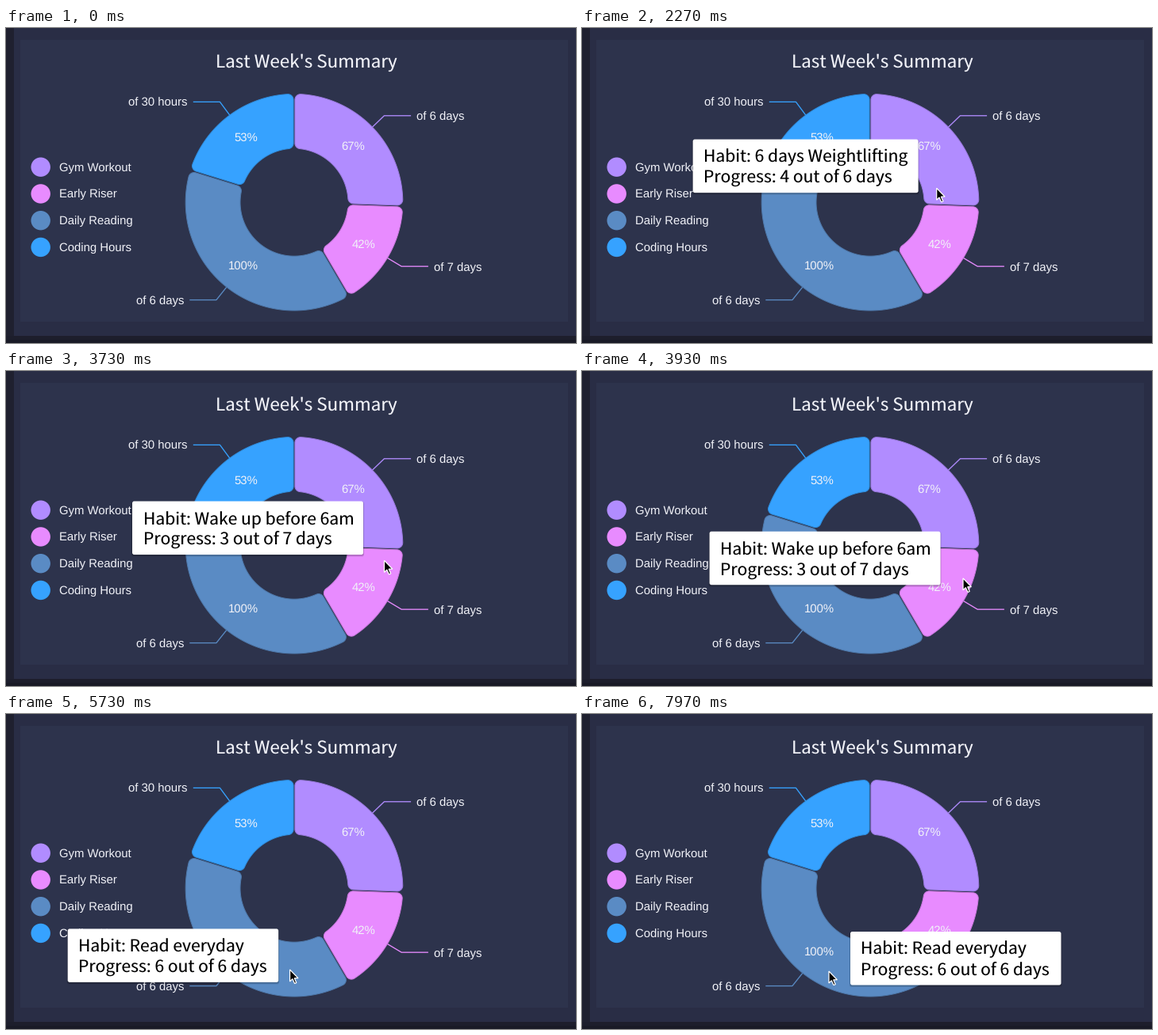
A matplotlib script that plays this animation: 718x398 px, repeating every 8 s.

```python
import numpy as np
import matplotlib.pyplot as plt
from matplotlib.animation import FuncAnimation
from matplotlib.colors import to_rgb
from matplotlib.patches import Circle, FancyBboxPatch, Polygon, Rectangle

W, H, DPI = 718, 398, 100
LOOP, STEP = 8000, 25
CX, CY, R_OUT, R_IN = 363, 220.2, 136.8, 68
CORNER, GAP = 7, 0.95
INK = "#f1f2f8"
SANS, HUMANIST = "Liberation Sans", "Noto Sans CJK JP"

plt.rcParams["text.hinting"] = "none"
plt.rcParams["toolbar"] = "None"

# name, percent, link label, colour
SLICES = [
    ("Gym Workout", 67, "of 6 days", "#b18cff"),
    ("Early Riser", 42, "of 7 days", "#e88bff"),
    ("Daily Reading", 100, "of 6 days", "#5a8bc4"),
    ("Coding Hours", 53, "of 30 hours", "#36a2ff"),
]

# start time, habit, progress, tooltip width
TIPS = [
    (1770, "6 days Weightlifting", "4 out of 6 days", 284),
    (3640, "Wake up before 6am", "3 out of 7 days", 291),
    (4850, "Read everyday", "6 out of 6 days", 265.5),
]
TIP_H, TIP_GAP, TIP_RISE = 67.5, 27, 50
SIDE_X, SIDE_LAG = 361.5, 45

# turning points of the pointer: time, x, y
PATH = np.array([
    (1330, 626, -20), (1400, 621, 5), (1750, 470, 140), (2620, 441, 220),
    (2770, 443, 177), (3050, 448, 115), (3930, 480, 262), (4500, 480, 268),
    (4830, 382, 318), (5200, 336, 324), (5550, 375, 321), (5730, 357, 323),
    (6050, 311, 325),
], float)

ARROW = np.array([(0, 0), (0, 15), (3.3, 11.7), (6, 17.6), (8.2, 16.6),
                  (5.7, 10.8), (10.4, 10.8)])


def smooth(t, ts, vs):
    """Monotone cubic interpolation through the points (ts, vs)."""
    h = np.diff(ts)
    d = np.diff(vs) / h
    a, b = d[:-1], d[1:]
    m = np.zeros(len(ts))
    same = a * b > 0
    m[1:-1][same] = 2 * a[same] * b[same] / (a[same] + b[same])
    i = np.clip(np.searchsorted(ts, t, "right") - 1, 0, len(h) - 1)
    u = np.clip((t - ts[i]) / h[i], 0, 1)
    return (vs[i] * (1 + 2 * u) * (1 - u) ** 2
            + vs[i + 1] * u * u * (3 - 2 * u)
            + h[i] * (m[i] * u * (1 - u) ** 2 - m[i + 1] * u * u * (1 - u)))


def tip_at(t):
    return sum(t >= tip[0] for tip in TIPS) - 1


def tip_goal(t):
    """Tooltip corner beside the pointer, on the chart's inner side."""
    x, y = pointer[t]
    if pointer[t - SIDE_LAG, 0] < SIDE_X:
        left = x + TIP_GAP
    else:
        left = x - TIP_GAP - TIPS[tip_at(t)][3]
    return np.array([left, y - TIP_RISE])


def spring_track(tension=120, friction=14, dt=0.001):
    """Tooltip corner per millisecond, pulled by a gentle spring."""
    start = TIPS[0][0]
    track = np.zeros((LOOP, 2))
    pos, vel = tip_goal(start), np.zeros(2)
    for t in range(start, LOOP):
        vel = vel + (tension * (tip_goal(t) - pos) - friction * vel) * dt
        pos = pos + vel * dt
        track[t] = pos
    return track


ms = np.arange(LOOP)
pointer = np.column_stack([smooth(ms, PATH[:, 0], PATH[:, k]) for k in (1, 2)])
tip_track = spring_track()


def polar(angle, radius, centre=(CX, CY)):
    """Point at a clockwise angle measured from twelve o'clock."""
    return np.column_stack([centre[0] + radius * np.sin(angle),
                            centre[1] - radius * np.cos(angle)])


def sector(a0, a1):
    """Outline of a ring sector with rounded corners and parallel gaps."""
    ro, ri = R_OUT - CORNER, R_IN + CORNER
    do = np.arcsin((GAP + CORNER) / ro)
    di = np.arcsin((GAP + CORNER) / ri)
    q = np.pi / 2

    def corner(angle, radius, start, stop):
        centre = polar(np.array([angle]), radius)[0]
        return polar(np.linspace(start, stop, 14), CORNER, centre)

    return np.vstack([
        corner(a0 + do, ro, a0 - q, a0 + do),
        polar(np.linspace(a0 + do, a1 - do, 90), R_OUT),
        corner(a1 - do, ro, a1 - do, a1 + q),
        corner(a1 - di, ri, a1 + q, a1 - di + 2 * q),
        polar(np.linspace(a1 - di, a0 + di, 60), R_IN),
        corner(a0 + di, ri, a0 + di + 2 * q, a0 + 3 * q),
    ])


fig = plt.figure(figsize=(W / DPI, H / DPI), dpi=DPI)
ax = fig.add_axes([0, 0, 1, 1])
ax.set_xlim(0, W)
ax.set_ylim(H, 0)
ax.axis("off")


def rect(x, y, w, h, color):
    ax.add_patch(Rectangle((x, y), w, h, fc=color, lw=0))


def label(x, y, text, px=14.85, font=SANS, color=INK, ha="left", z=3):
    return ax.text(x, y, text, fontsize=px * 72 / DPI, family=font,
                   color=color, ha=ha, va="baseline", zorder=z)


rect(0, 0, W, H, "#292d45")
rect(0, 0, 10, H, "#1f202f")
rect(0, 389, W, 9, "#1d1e2c")
rect(0, 394, W, 4, "#191a26")
rect(18, 15, 690, 356, "#2d334c")
label(378.5, 51, "Last Week's Summary", 22.4, HUMANIST, ha="center")

angle = 0
total = sum(s[1] for s in SLICES)
for i, (name, pct, note, color) in enumerate(SLICES):
    end = angle + 2 * np.pi * pct / total
    mid = (angle + end) / 2
    edge = [c * 0.88 for c in to_rgb(color)]
    ax.add_patch(Polygon(sector(angle, end), fc=color, ec=edge, lw=0.72,
                         zorder=2))
    x, y = polar(mid, (R_OUT + R_IN) / 2)[0]
    label(x, y + 4.6, f"{pct}%", ha="center")

    side = 1 if np.sin(mid) > 0 else -1
    (x0, y0), (x1, y1) = polar(mid, R_OUT)[0], polar(mid, R_OUT + 20.8)[0]
    ax.plot([x0, x1, x1 + side * 33], [y0, y1, y1], color=color, lw=0.95,
            zorder=1)
    label(x1 + side * 41, y1 + 5.3, note, ha="left" if side > 0 else "right")

    y = 175.7 + 33.75 * i
    ax.add_patch(Circle((43.7, y), 12.2, fc=color, lw=0))
    label(67, y + 4.9, name)
    angle = end


def tip_box(color, alpha, z):
    box = FancyBboxPatch((0, 0), 1, TIP_H, fc=color, alpha=alpha, lw=0,
                         boxstyle="round,pad=0,rounding_size=2.5", zorder=z)
    return ax.add_patch(box)


shadows = [(tip_box("black", 0.13, 5), grow) for grow in (2, 1)]
box = tip_box("white", 1, 6)
lines = [label(0, 0, "", 21.1, HUMANIST, "#000000", z=7) for _ in range(2)]
arrow = ax.add_patch(Polygon(ARROW, fc="black", ec="white", lw=0.9, zorder=9))
tip_parts = [box, *lines, *(s for s, _ in shadows)]


def draw(frame):
    t = frame * STEP
    arrow.set_visible(t >= PATH[0, 0])
    arrow.set_xy(pointer[t] + ARROW)

    k = tip_at(t)
    for part in tip_parts:
        part.set_visible(k >= 0)
    if k >= 0:
        _, habit, progress, width = TIPS[k]
        x, y = tip_track[t]
        box.set_bounds(x, y, width, TIP_H)
        for shadow, grow in shadows:
            shadow.set_bounds(x - grow / 2, y + 0.5, width + grow, TIP_H + grow)
        rows = (f"Habit: {habit}", f"Progress: {progress}")
        for line, text, dy in zip(lines, rows, (28.5, 54.5)):
            line.set_text(text)
            line.set_position((x + 13.5, y + dy))
    return [*tip_parts, arrow]


anim = FuncAnimation(fig, draw, frames=LOOP // STEP, interval=STEP,
                     init_func=lambda: draw(0), repeat=True, repeat_delay=0)
plt.show()
```
